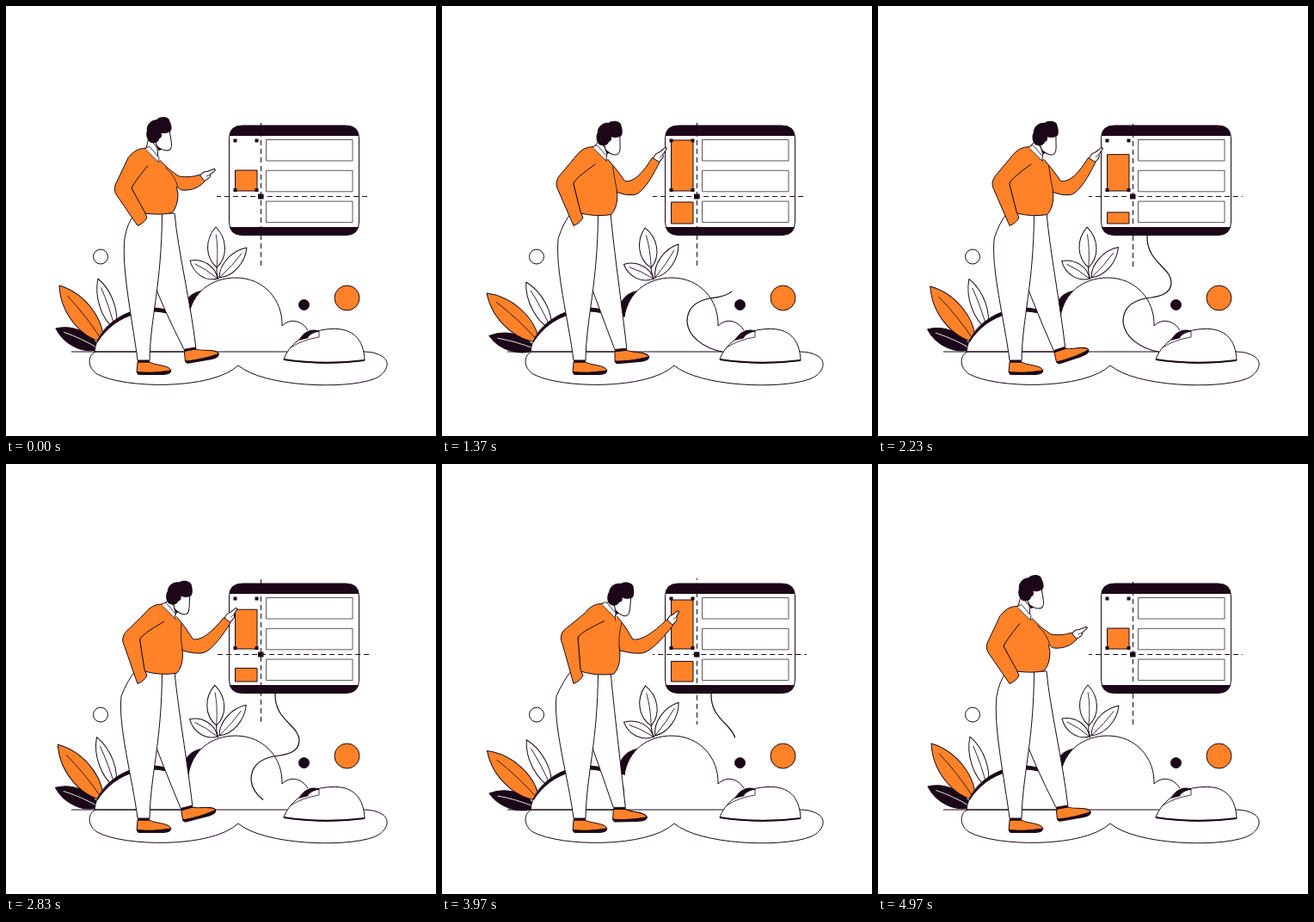
Recreate the animation shown at these times as an HTML page with a canvas. Size 500 by 500 pixels, loop 5010 ms.

```html
<!DOCTYPE html>
<html lang="en">
<head>
<meta charset="utf-8">
<title>Presenter</title>
<style>
html, body { margin: 0; width: 100%; height: 100%; overflow: hidden; background: #fff; }
canvas { display: block; width: 100vw; height: 100vh; }
</style>
</head>
<body>
<canvas id="stage" width="500" height="500"></canvas>
<script>
const LOOP = 5010, INK = '#1b0718', ORANGE = '#ff8228', WHITE = '#fff', GREY = '#5c555b';
const g = document.getElementById('stage').getContext('2d');
const ramp = (t, from, to) => Math.max(0, Math.min(1, (t - from) / (to - from)));
const ease = (t, from, to) => { const u = ramp(t, from, to); return u * u * (3 - 2 * u); };

// Motion: each value is driven by the time alone
const swing = t => Math.cos(t / LOOP * 4 * Math.PI);
const leanAt = t => .56 * ease(t, 0, 1050) + .44 * ease(t, 2230, 3400) - ease(t, 3950, 4980);
const liftAt = t => ease(t, 0, 1000) - .25 * ease(t, 2230, 3470) - .75 * ease(t, 3950, 4980);
const barAt = t => ease(t, 60, 1300) - .6 * ease(t, 1700, 2450) + .6 * ease(t, 2500, 3300) - ease(t, 3800, 4970);
const kickAt = t => Math.max(0, swing(t)) * Math.sin(t / LOOP * Math.PI) ** 4;

function draw(d, fill, stroke = INK, width = 1) {
  const p = new Path2D(d);
  if (fill) { g.fillStyle = fill; g.fill(p); }
  if (stroke) { g.strokeStyle = stroke; g.lineWidth = width; g.stroke(p); }
}

function box(x, y, w, h, fill, stroke) {
  draw(`M${x} ${y}h${w}v${h}h${-w}Z`, fill, stroke);
}

function disc(x, y, r, fill) {
  draw(`M${x - r} ${y}a${r} ${r} 0 1 1 ${2 * r} 0a${r} ${r} 0 1 1 ${-2 * r} 0Z`, fill);
}

function at(x, y, angle, paint) {
  g.save();
  g.translate(x, y);
  g.rotate(angle);
  paint();
  g.restore();
}

// Leaf from base to tip, turned around its base
function leaf(x, y, tx, ty, half, turn, fill, rib = INK) {
  const len = Math.hypot(tx - x, ty - y), h = half * 1.33;
  at(x, y, Math.atan2(ty - y, tx - x) + turn, () => {
    draw(`M0 0C${len * .25} ${-h} ${len * .7} ${-h} ${len} 0C${len * .7} ${h} ${len * .25} ${h} 0 0Z`, fill);
    draw(`M0 0Q${len * .45} ${half * .25} ${len * .82} 0`, null, rib, .8);
  });
}

function plants(t) {
  const sway = (swing(t) - 1) / 2, side = sway * .165;
  leaf(127, 376, 107, 317, 8.5, side, WHITE);
  leaf(109, 399, 58, 375, 10, side, INK, WHITE);
  leaf(113, 391, 62, 325, 13.5, side, ORANGE);
  at(247, 318, sway * .135, () => {
    draw('M0 0Q-3 -8 -2 -16', null);
    leaf(-2, -14, -3, -61, 10, 0, WHITE);
    leaf(-1, -1, -33, -22, 8, 0, WHITE);
    leaf(1, -2, 33, -37, 8, 0, WHITE);
  });
}

function ground() {
  draw('M104 402C94 407 95 421 106 428C137 445 239 447 270 418C300 443 394 446 427 434C442 429 449 414 437 407Q429 402 416 402', WHITE);
  draw('M103 402C106 372 139 352 170 352C192 352 205 362 212 380V402Z', WHITE);
  draw('M106 391C118 366 142 352 169 351C183 351 193 355 200 361C178 353 164 354 150 358C132 363 117 374 106 391Z', INK);
  draw('M204 362C205 345 213 332 231 331L214 360Z', INK);
  const hills = 'M212 362C216 333 239 316 267 316C300 316 322 342 321 372C331 362 344 366 351 377';
  draw(hills + 'V402H212Z', WHITE, null);
  draw(hills, null);
  draw('M76 402H327', null, INK, 1.2);
}

const CORD = 'M326 402C304 398 286 384 285 367C285 350 296 343 311 340C328 338 341 335 341 321C340 303 312 298 313 267';
const ruler = document.createElementNS('http://www.w3.org/2000/svg', 'path');
ruler.setAttribute('d', CORD);
const CORD_LEN = ruler.getTotalLength();

function cord(t) {
  const end = ramp(t, 30, 2160), start = ramp(t, 2530, 4590);
  if (end <= start) return;
  g.save();
  g.setLineDash([CORD_LEN * (end - start), 999]);
  g.lineDashOffset = -CORD_LEN * start;
  draw(CORD, null, INK, 1.2);
  g.restore();
}

function mouse() {
  draw('M323 411C328 396 346 377 378 375.5C404 374 416 388 417 412Q370 419 323 411Z', WHITE);
  draw('M340 389C346 379 355 374 364 378L363 384Q350 386 340 389Z', INK, null);
  draw('M352 384Q358 379 364 379V385L350 389Z', WHITE, null);
  draw('M331 397Q345 388 364 385V378', null, INK, .8);
  draw('M323 411Q370 418 417 412', null, INK, 2.2);
}

function panel(t) {
  const outline = 'M275 139H395Q410.500 139 410.500 154V251Q410.500 266.500 395 266.500H275Q259.500 266.500 259.500 251V154Q259.500 139 275 139Z';
  draw(outline, WHITE);
  g.save();
  g.clip(new Path2D(outline));
  box(258, 138, 154, 13, INK, null);
  box(258, 257, 154, 11, INK, null);
  g.restore();
  for (let i = 0; i < 3; i++) box(302.5, 155.5 + 35.8 * i, 100.5, 24.5, WHITE, GREY);

  const grow = barAt(t), upper = 24 + 35 * grow, lower = 25 * grow;
  box(266.5, 215 - upper, 25.5, upper, ORANGE, INK);
  if (lower > .5) box(266.5, 253 - lower, 25.5, lower, ORANGE, INK);
  for (const x of [266.5, 291.5])
    for (const y of [156.5, 214]) box(x - 2, y - 2, 4, 4, INK, null);

  const march = t / LOOP * 110;
  g.save();
  g.setLineDash([6, 4]);
  g.lineDashOffset = 1 - march;
  draw('M245 221.500H424', null);
  g.lineDashOffset = 7 + march;
  draw('M296.500 133V303', null);
  g.restore();
  box(293, 218.5, 6.5, 6, INK, null);
}

function shoe(x, y, turn) {
  at(x, y, turn, () => {
    draw('M1 2H15C20 6 38 5 40 12Q20 16 0 14Z', ORANGE);
    draw('M0 13C10 14.500 30 13.500 40 11.500Q41 17 28 17H3Q0 17 0 13Z', INK, null);
    box(1, -1, 14, 3.5, INK, null);
  });
}

function legs(t, lean) {
  const kick = kickAt(t), turn = (9 * lean - 10 - 18 * kick) * Math.PI / 180;
  const x = 204 - 4 * lean + 2 * swing(t), y = 399.5 + 2 * kick;
  const ankle = d => [x + d * Math.cos(turn), y + d * Math.sin(turn)];
  const [lx, ly] = ankle(1), [rx, ry] = ankle(15), thigh = 137 - 5 * lean;
  shoe(x, y, turn);
  draw(`M181 241H196C200 285 ${rx - 6} 345 ${rx} ${ry}L${lx} ${ly}Q183 352 172 322Z`, WHITE);
  shoe(152, 412, 0);
  draw(`M150 241Q141 252 ${thigh + 1} 270C${thigh - 3} 305 147 365 153 412H167C168 360 181 325 181.500 241Z`, WHITE);
}

function head(x, y, lean) {
  at(x, y, .25 * lean - .16, () => {
    draw('M-7 10L-5 18Q2 25 8 24Q12 23 12 15V0H-4Z', WHITE);
    draw('M-6 16L-3 20L0 22L-4 23Z', INK, null);
    draw('M-9 13C-15 13 -17 3 -14 -2C-14 -9 -7 -14 -1 -13C4 -17 14 -15 14 -9C16 -3 15 3 12 3C8 5 4 4 2 3Q3 8 -1 9Q-3 14 -9 13Z', INK, null);
  });
}

function pointingHand(cx, cy, fx, fy) {
  const reach = Math.hypot(fx - cx, fy - cy);
  at(cx, cy, Math.atan2(fy - cy, fx - cx), () => {
    draw(`M-1 -3.500Q5 -6 9 -3L${reach} -1V.8L10 2Q9 6 -1 4Z`, WHITE);
    draw('M5 1L10 2', null, INK, .7);
  });
}

function man(t) {
  const lean = leanAt(t), lift = liftAt(t);
  const ox = 178 + 30 * lean, oy = 145 + 7 * lean;        // head
  const ax = 163 + 24 * lean, ay = 165.5 - 3 * lean;      // collar
  const bx = ax + 14, by = ay + 14;
  const ex = 126 + 12 * lean, ey = 212 - 10 * lean;       // elbow on the hip side
  const hx = 197 + 7 * lean, hy = 240.5 + 3.5 * lean;     // front of the hem
  const cx = 228 + 37 * lean, cy = 200 - 21 * lift;       // cuff
  const ux = 211 + 21 * lean, uy = 214 + 4 * lift + 3 * lean; // elbow of the pointing arm

  legs(t, lean);
  draw(`M${ox - 12} ${oy + 8}L${ax} ${ay}L${bx} ${by}L${ox - 2} ${oy + 20}Z`, WHITE);
  head(ox, oy, lean);

  // torso
  draw(`M${ax} ${ay}L${bx} ${by}Q${hx + 1} ${ay + 30} ${hx + 3} ${hy - 22}Q${hx + 3} ${hy - 8} ${hx - 4} ${hy}Q180 ${hy + 3} 161 241L${ex + 20} ${ey}L${ax - 8} ${ay + 8}Z`, ORANGE);
  draw(`M${ax - 2} ${ay}L${ax + 4} ${ay - 2}L${bx + 1} ${by - 3}L${bx} ${by + 2}Z`, WHITE, INK, .8);

  pointingHand(cx, cy, 243 + 32 * lean, 190 - 25 * lift);

  // pointing arm
  const len = Math.hypot(cx - ux, cy - uy), half = 5;
  const nx = -(cy - uy) / len * half, ny = (cx - ux) / len * half;
  const sleeve = `M${bx + 2} ${by}Q${bx + 12} ${by + 11} ${ux - 10} ${uy - 16}Q${ux + 4} ${uy - 14} ${cx - nx} ${cy - ny}L${cx + nx} ${cy + ny}Q${ux + 12} ${uy - 1} ${ux} ${uy}Q${ux - 9} ${uy + 1} ${hx + 3} ${uy - 3}`;
  draw(sleeve + `L${bx} ${by + 14}Z`, ORANGE, null);
  draw(sleeve, null);
  draw(`M${hx + 3} ${uy - 3}Q${hx} ${uy - 16} ${bx + 8} ${by + 8}`, null, INK, .8);

  // arm on the hip
  const arm = `M${ax} ${ay}Q${ax - 12} ${ay - 1} ${ax - 21} ${ay + 11}L${ex + 3} ${ey - 8}Q${ex - 2} ${ey} ${ex + 2} ${ey + 7}L153 255.500Q160 253 164 246L161 239L${ex + 20} ${ey}Q${ex + 22} ${ey - 6} ${ax + 2} ${ay + 20}`;
  draw(arm, ORANGE, null);
  draw(arm, null);
}

function render(t) {
  g.fillStyle = WHITE;
  g.fillRect(0, 0, 500, 500);
  g.lineJoin = 'round';
  plants(t);
  ground();
  disc(110, 291.5, 8.5, WHITE);
  disc(346.5, 347.5, 6, INK);
  disc(396.5, 339.5, 14.5, ORANGE);
  cord(t);
  mouse();
  panel(t);
  man(t);
}

const begun = performance.now();
function tick() {
  render((performance.now() - begun) % LOOP);
  requestAnimationFrame(tick);
}
tick();
</script>
</body>
</html>
```
